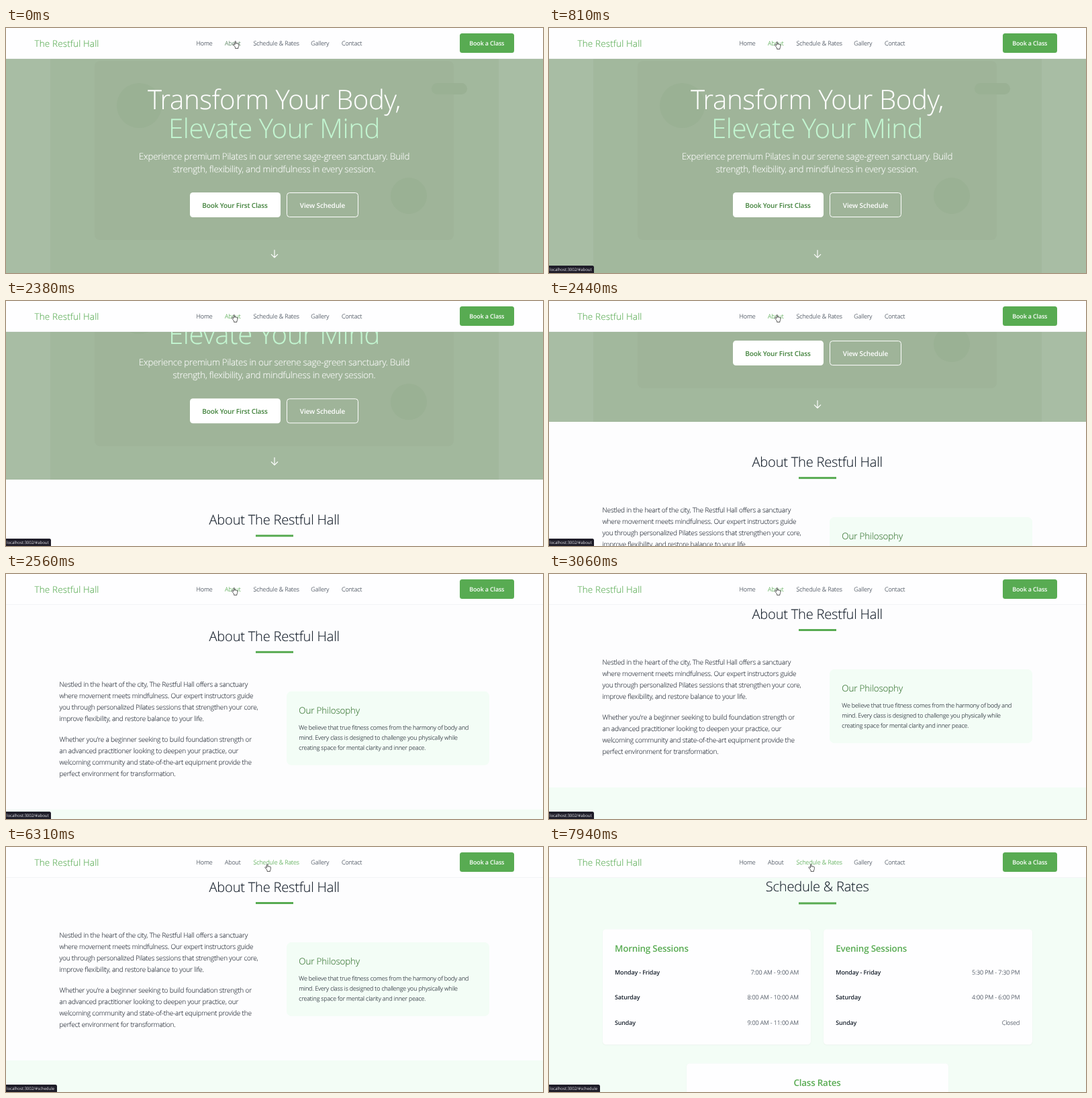
Write an HTML page that moves like this. It is 800 px wide and 365 px high and loops after 8000 ms.

```html
<!DOCTYPE html>
<html lang="en">
<head>
<meta charset="utf-8">
<title>Pilates studio page</title>
<style>
html, body { margin: 0; width: 100%; height: 100%; overflow: hidden; background: #fdfdfe; }
#stage { position: relative; width: 800px; height: 365px; overflow: hidden;
  font-family: "Open Sans", "Noto Sans", sans-serif; text-rendering: geometricPrecision; }
#stage * { position: absolute; box-sizing: border-box; }
#page { left: 0; top: 0; width: 800px; height: 1100px; }
#head { left: 0; top: 0; width: 800px; height: 45.5px; background: #fefeff; border-bottom: 0.6px solid #f3f4f6; }
#stage span { line-height: 0; white-space: nowrap; font-weight: 300; letter-spacing: -0.011em; -webkit-text-stroke: 0.12px; }
#stage span.body { letter-spacing: -0.018em; }
#stage span.semi { font-weight: 600; letter-spacing: -0.016em; -webkit-text-stroke: 0; }
#stage span.logo { letter-spacing: 0.014em; }
.mid { transform: translateX(-50%); }
.end { transform: translateX(-100%); }
.card { background: #fefeff; box-shadow: 0 0.6px 2px rgba(0, 0, 0, 0.06); }
#tip { left: 0; top: 354px; height: 11px; background: #1f1d29; border-radius: 0 2.5px 0 0; }
#stage #tip span { left: 1px; top: 5.8px; font-size: 6.15px; font-weight: 400; letter-spacing: -0.015em; color: #e4e4ea; -webkit-text-stroke: 0; }
svg { overflow: visible; }
</style>
</head>
<body>
<div id="stage">
  <div id="page"></div>
  <div id="head"></div>
  <div id="tip"><span></span></div>
  <svg id="hand" width="10" height="12" viewBox="0 0 16 20">
    <path d="M5 14L1.5 10q-1-1.6.4-2.2q1-.4 2 .8L5.5 10V2.5q0-1.5 1.3-1.5t1.3 1.5V7q0-.9 1.2-.9t1.3 1.1q.2-.8 1.2-.7t1.2 1.2q.3-.6 1.1-.5t1.1 1.3V12.5q0 2-1.5 4V19H6.5V17Z"
      fill="#fff" stroke="#2a2a2a" stroke-width="1.3" stroke-linejoin="round"/>
  </svg>
</div>
<script>
const LOOP = 8000, STEP = 62.5;
const UNIT = 0.559;               // page px to stage font px
const ABOUT = 366, SCHEDULE = 683.6;
const NAME = "The Restful Hall";
const GREEN = "#58ab52", DARK = "#17202c", TEXT = "#2c333d", GRAY = "#414a56", PALE = "#f3fdf6";

const $ = id => document.getElementById(id);
const page = $("page"), head = $("head"), tip = $("tip"), hand = $("hand");

function box(parent, x, y, w, h, fill, radius = 0, cls = "") {
  const el = document.createElement("div");
  el.className = cls;
  el.style.cssText = `left:${x}px;top:${y}px;width:${w}px;height:${h}px;border-radius:${radius}px`;
  if (fill) el.style.background = fill;
  parent.append(el);
  return el;
}

// y is the middle of the capitals
function label(parent, str, x, y, size, color, cls = "") {
  const el = document.createElement("span");
  el.className = cls;
  el.textContent = str;
  el.style.cssText = `left:${x}px;top:${y}px;font-size:${size * UNIT}px;color:${color}`;
  parent.append(el);
  return el;
}

function lines(rows, x, y, gap, size, color, cls = "") {
  rows.forEach((row, i) => label(page, row, x, y + i * gap, size, color, "body " + cls));
}

function title(str, top) {
  label(page, str, 399.7, top + 58.6, 36, DARK, "mid");
  box(page, 371.7, top + 82.4, 56, 2.6, GREEN);
}

function buildHero() {
  box(page, 0, 0, 800, 365.7, "#a8bda4");
  box(page, 66, 0, 667.5, 365.7, "#a2b89d");
  box(page, 132, 48.5, 534.5, 267.5, "#9fb499", 8);
  box(page, 165, 82, 67, 67, "#9ab194", 34);
  box(page, 634, 82, 53, 17, "#9ab194", 8.5);
  box(page, 572.5, 222.5, 54.5, 54.5, "#9ab194", 28);

  label(page, "Transform Your Body,", 399.5, 106.4, 72, "#fff", "mid");
  label(page, "Elevate Your Mind", 399.5, 148.7, 72, "#c3f6d1", "mid");
  lines(["Experience premium Pilates in our serene sage-green sanctuary. Build",
    "strength, flexibility, and mindfulness in every session."], 399.5, 190.7, 18.8, 24, "#fff", "mid");

  box(page, 273.5, 245.3, 135, 36.3, "#fff", 4.5);
  label(page, "Book Your First Class", 341, 263.8, 18, "#3f8039", "semi mid");
  box(page, 417.7, 245.3, 107.6, 36.3, "", 4.5).style.border = "1.2px solid #fff";
  label(page, "View Schedule", 471.5, 263.8, 18, "#fff", "semi mid");

  page.insertAdjacentHTML("beforeend",
    `<svg id="arrow" style="left:392.5px;top:333px" width="14" height="14" viewBox="0 0 24 24">
      <path d="M12 2V21M4 13L12 21L20 13" fill="none" stroke="#fff" stroke-width="2" stroke-linecap="round" stroke-linejoin="round"/></svg>`);
}

function buildAbout() {
  box(page, 0, 365.7, 800, 318, "#fdfdfe");
  title("About " + NAME, ABOUT);
  lines(["Nestled in the heart of the city, " + NAME + " offers a sanctuary",
    "where movement meets mindfulness. Our expert instructors guide",
    "you through personalized Pilates sessions that strengthen your core,",
    "improve flexibility, and restore balance to your life."], 79.5, ABOUT + 131.3, 16.94, 18, TEXT);
  lines(["Whether you're a beginner seeking to build foundation strength or",
    "an advanced practitioner looking to deepen your practice, our",
    "welcoming community and state-of-the-art equipment provide the",
    "perfect environment for transformation."], 79.5, ABOUT + 212.8, 16.94, 18, TEXT);
  box(page, 417.7, ABOUT + 141.5, 302.3, 110, PALE, 7);
  label(page, "Our Philosophy", 436.3, ABOUT + 170.4, 24, "#3f7a3a");
  lines(["We believe that true fitness comes from the harmony of body and",
    "mind. Every class is designed to challenge you physically while",
    "creating space for mental clarity and inner peace."], 436.3, ABOUT + 195.8, 15.2, 16, TEXT);
}

function sessions(x, heading, hours) {
  box(page, x, SCHEDULE + 122.5, 310.7, 172, "", 4.7, "card");
  label(page, heading, x + 18.3, SCHEDULE + 151, 24, GREEN, "semi");
  ["Monday - Friday", "Saturday", "Sunday"].forEach((day, i) => {
    const y = SCHEDULE + 187.2 + i * 37.5;
    label(page, day, x + 18.3, y, 16, DARK, "semi");
    label(page, hours[i], x + 292.3, y, 16, GRAY, "end");
  });
}

function buildSchedule() {
  box(page, 0, SCHEDULE, 800, 400, PALE);
  title("Schedule & Rates", SCHEDULE);
  sessions(79.7, "Morning Sessions", ["7:00 AM - 9:00 AM", "8:00 AM - 10:00 AM", "9:00 AM - 11:00 AM"]);
  sessions(409, "Evening Sessions", ["5:30 PM - 7:30 PM", "4:00 PM - 6:00 PM", "Closed"]);
  box(page, 205, SCHEDULE + 322.5, 389.5, 80, "", 4.7, "card");
  label(page, "Class Rates", 399.5, SCHEDULE + 351, 24, GREEN, "semi mid");
}

buildHero();
buildAbout();
buildSchedule();

label(head, NAME, 42.5, 23.3, 24, GREEN, "logo");
const nav = [["Home", 283.5], ["About", 326], ["Schedule & Rates", 368.5], ["Gallery", 454.3], ["Contact", 500]]
  .map(([str, x]) => label(head, str, x, 22.9, 16, GRAY));
box(head, 675.9, 8.4, 81, 28.2, GREEN, 3.5);
label(head, "Book a Class", 716.3, 22.8, 16, "#fff", "semi mid");
const arrow = $("arrow"), tipText = tip.firstElementChild;

const clamp = v => Math.min(1, Math.max(0, v));
const span = (t, start, length) => clamp((t - start) / length);
const smooth = u => u * u * (3 - 2 * u);
const lerp = (a, b, u) => a + (b - a) * u;

function bezier(x1, y1, x2, y2) {
  const at = (a, b, s) => 3 * a * s * (1 - s) ** 2 + 3 * b * s * s * (1 - s) + s ** 3;
  return x => {
    let lo = 0, hi = 1;
    for (let i = 0; i < 24; i++) {
      const s = (lo + hi) / 2;
      if (at(x1, x2, s) < x) lo = s; else hi = s;
    }
    return at(y1, y2, lo);
  };
}
const easeInOut = bezier(0.42, 0, 0.58, 1);
const fall = bezier(0.8, 0, 1, 1), rise = bezier(0, 0, 0.2, 1);

// time, x, y of the pointer's middle
const path = [[0, 342.5, 25], [190, 340.5, 26], [3560, 340.5, 26], [3800, 341.5, 26],
  [5060, 341.5, 26], [5440, 390, 31], [7690, 390, 31], [7900, 391, 31]];

function pointer(t) {
  let i = 0;
  while (i < path.length - 2 && t > path[i + 1][0]) i++;
  const [t0, x0, y0] = path[i], [t1, x1, y1] = path[i + 1];
  const u = smooth(span(t, t0, t1 - t0));
  return [lerp(x0, x1, u), lerp(y0, y1, u)];
}

function bounce(t) {
  const p = (t / 1000 + 0.06) % 1;
  return p < 0.5 ? fall(p * 2) : 1 - rise(p * 2 - 1);
}

function tint(el, u) {
  const from = [65, 74, 86], to = [88, 171, 82];
  el.style.color = `rgb(${from.map((c, i) => Math.round(lerp(c, to[i], u)))})`;
}

function draw(t) {
  const scroll = ABOUT * easeInOut(span(t, 2217, 437)) + (SCHEDULE - ABOUT) * easeInOut(span(t, 6850, 407));
  page.style.transform = `translateY(${-scroll.toFixed(2)}px)`;
  arrow.style.transform = `translateY(${(-3.3 + 3.5 * bounce(t)).toFixed(2)}px)`;

  const [x, y] = pointer(t);
  hand.style.transform = `translate(${(x - 5).toFixed(2)}px, ${(y - 6).toFixed(2)}px)`;

  tint(nav[1], span(t, -100, 200) - span(t, 5190, 200));
  tint(nav[2], span(t, 5290, 200));

  const next = t >= 5290;
  tipText.textContent = "localhost:3002/#" + (next ? "schedule" : "about");
  tip.style.width = next ? "76px" : "67px";
  tip.style.opacity = span(t, 120, 250);
}

function frame(now) {
  const t = now % LOOP;
  draw(Math.floor((t + 5) / STEP) * STEP % LOOP);
  requestAnimationFrame(frame);
}
draw(0);
requestAnimationFrame(frame);
</script>
</body>
</html>
```
